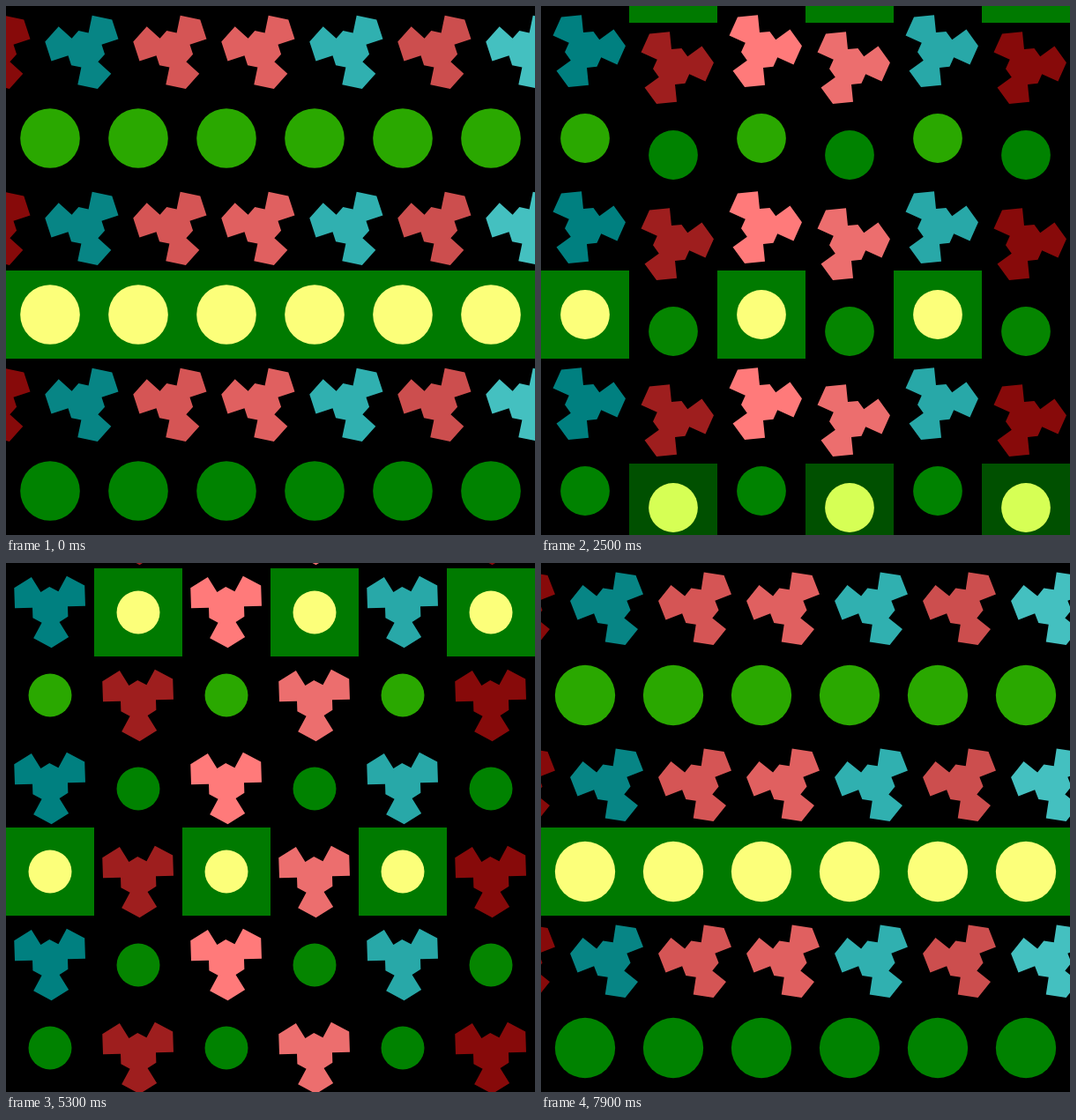
These frames come from a looping animation (600x600 px, 8 s). An HTML page with a canvas:

```html
<!DOCTYPE html>
<html>
<head>
<meta charset="utf-8">
<style>
html, body { margin: 0; width: 100%; height: 100%; overflow: hidden; background: #000; }
canvas { display: block; }
</style>
</head>
<body>
<canvas width="600" height="600"></canvas>
<script>
const ctx = document.querySelector('canvas').getContext('2d');
const LOOP = 8000, STEP = 100, RAD = Math.PI / 180;

// one colour per pinwheel column, one [circle, tile] pair per disc row
const wheelColors = ['#008080', '#9e1e1e', '#ff7a7a', '#ec6e6e', '#28a8a8', '#870a0a', '#078585',
  '#d55555', '#e06060', '#30b0b0', '#cc4e4e', '#44c0c0', '#b43434'];
const discRows = [['#2aa800'], ['#fcff7a', '#007a00'], ['#008200'], ['#058500'],
  ['#d6ff55', '#005000'], ['#fcff7a', '#007a00']];

// swing phase in degrees over time
const phaseKeys = [[0, -69.1], [1100, -15.2], [1900, 14.7], [3200, 68.2],
  [5300, 150.7], [6400, 194.8], [7900, 252.2], [8000, 256]];

function phase(t) {
  const i = phaseKeys.findIndex(k => k[0] > t);
  const [t0, a] = phaseKeys[i - 1], [t1, b] = phaseKeys[i];
  return a + (b - a) * (t - t0) / (t1 - t0);
}

// hexagonal hub with three lobes; polar corners repeat every 120 degrees
const side = 40 / Math.sqrt(3);
const corners = [[40, 30], [20, 30], [side, 60], [20, 90], [40, 90], [2 * side, 120]];

function wheel(x, y, turn, color) {
  ctx.fillStyle = color;
  ctx.beginPath();
  for (let k = 0; k < 3; k++) {
    for (const [r, deg] of corners) {
      const a = (deg + 120 * k + turn) * RAD;
      ctx.lineTo(x + r * Math.cos(a), y + r * Math.sin(a));
    }
  }
  ctx.fill();
}

function disc(x, y, r, [color, tile]) {
  if (tile) {
    ctx.fillStyle = tile;
    ctx.fillRect(x - 50, y - 50, 100, 100);
  }
  ctx.fillStyle = color;
  ctx.beginPath();
  ctx.arc(x, y, r, 0, 2 * Math.PI);
  ctx.fill();
}

function draw(t) {
  const swing = Math.sin(phase(t) * RAD);
  const slideX = Math.min(0, 600 * swing);
  const slideY = Math.max(0, 600 * swing);
  const radius = 35 * Math.sqrt(Math.abs(swing));
  ctx.fillStyle = '#000';
  ctx.fillRect(0, 0, 600, 600);
  wheelColors.forEach((color, col) => {
    const x = 50 + 100 * col;
    const up = col % 2 ? Math.round(slideY) : 0;
    discRows.forEach((look, row) => {
      const y = 200 * row - up;
      if (col < 6) disc(x, y + 150, radius, look);
      wheel(x + slideX, y + 50, 180 * swing, color);
    });
  });
}

const start = performance.now();
function tick() {
  const t = (performance.now() - start) % LOOP;
  draw(Math.floor(t / STEP) * STEP);
  requestAnimationFrame(tick);
}
tick();
</script>
</body>
</html>
```
